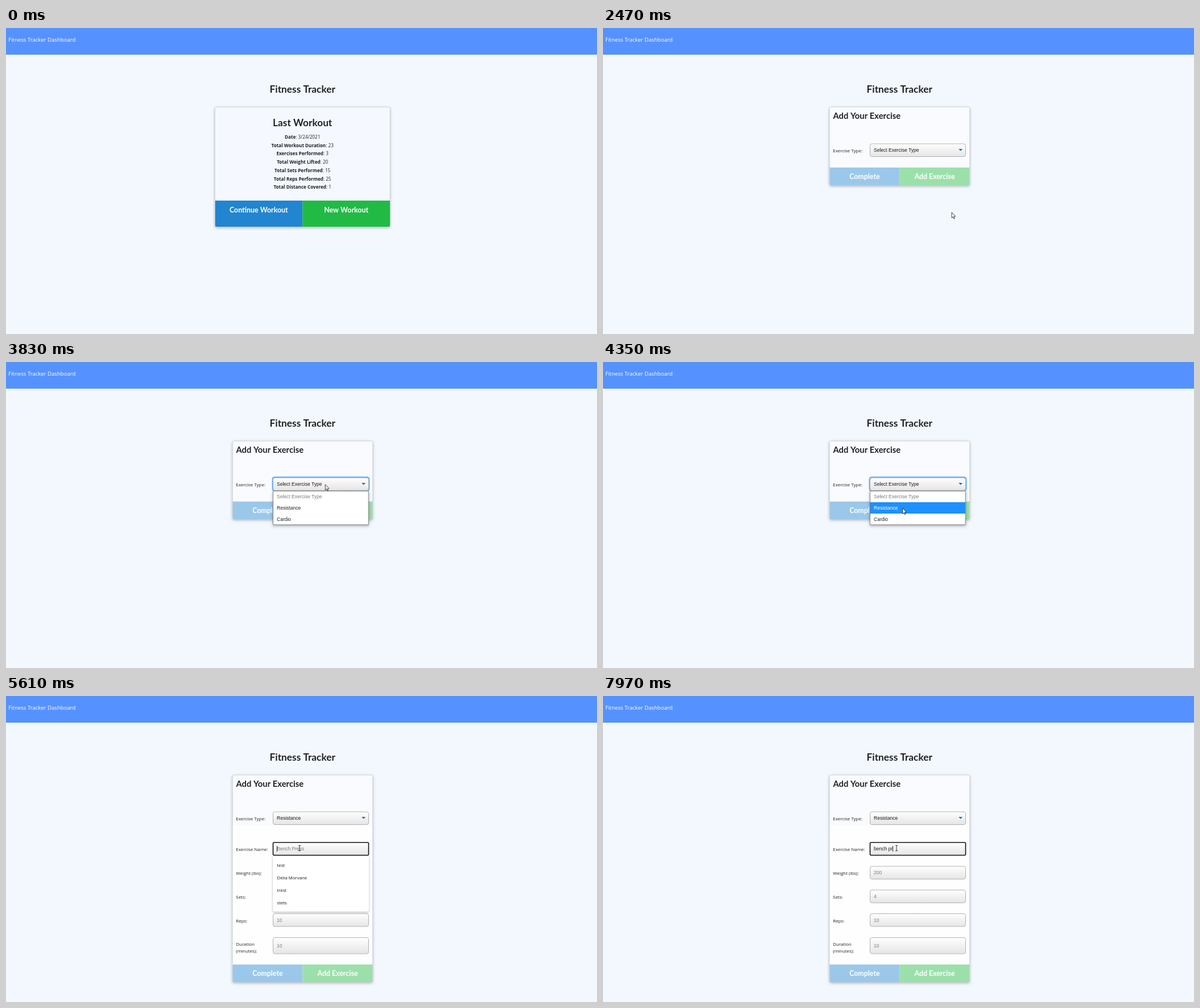
Animation of 1039x539 px, one loop 8000 ms. Source, as an HTML page with a canvas:

```html
<!DOCTYPE html>
<html lang="en">
<head>
<meta charset="utf-8">
<title>Fitness Tracker</title>
<style>
html, body { margin: 0; width: 100%; height: 100%; overflow: hidden; background: #f3f8ff; }
canvas { display: block; }
</style>
</head>
<body>
<canvas id="stage" width="1039" height="539"></canvas>
<script>
const ctx = document.getElementById('stage').getContext('2d');
const LOOP = 8000;
const MID = 521.2;
const UI = '"Open Sans", "Noto Sans", sans-serif';
const HEAD = 'Lato, sans-serif';
const FIELD = '"Liberation Sans", Arial, sans-serif';
const INK = '#1f2124';
const GREY = '#7b7b7b';

// Pointer stops: time, x, y, shape
const POINTER = [
  [0, 0, 0, ''],
  [880, 723, 453, 'arrow'], [1010, 688, 416, 'arrow'], [1140, 648.5, 372.5, 'arrow'],
  [1280, 619, 344, 'hand'], [1400, 579, 319, 'hand'], [1520, 592, 320, 'hand'], [1640, 613, 324.5, 'hand'],
  [2470, 612.8, 324.5, 'arrow'], [2750, 617, 366, 'arrow'], [2870, 621.5, 392, 'arrow'],
  [3140, 614.5, 359.5, 'arrow'], [3290, 564.5, 256.5, 'arrow'],
  [3440, 562, 228, 'arrow'], [3560, 561, 219, 'arrow'], [3680, 561, 215.5, 'arrow'],
  [4080, 546.5, 228, 'arrow'], [4230, 535, 246, 'arrow'], [4350, 526.3, 257.3, 'arrow'],
  [5190, 516, 267.5, 'beam'], [5460, 516, 268, 'beam']
];
const TYPED = [[0, ''], [6760, 'b'], [6880, 'be'], [7000, 'ben'], [7250, 'bench'], [7820, 'bench '], [7970, 'bench pr']];
const STATS = [
  ['Date', '3/24/2021'], ['Total Workout Duration', '23'], ['Exercises Performed', '3'],
  ['Total Weight Lifted', '20'], ['Total Sets Performed', '15'],
  ['Total Reps Performed', '25'], ['Total Distance Covered', '1']
];
// Label, placeholder, top, height
const FIELDS = [
  ['Exercise Name:', 'Bench Press', 257.5, 23], ['Weight (lbs):', '200', 299.5, 23],
  ['Sets:', '4', 341.3, 23], ['Reps:', '10', 383, 23], ['Duration', '10', 425, 29]
];
const HINTS = ['test', 'Delia Morvane', 'trest', 'stets'];

const at = (keys, t) => keys.reduce((found, k) => (k[0] <= t ? k : found));

function text(str, x, y, font, color = INK, align = 'left') {
  ctx.font = font;
  ctx.fillStyle = color;
  ctx.textAlign = align;
  ctx.fillText(str, x, y);
}

function rect(x, y, w, h, color) {
  ctx.fillStyle = color;
  ctx.fillRect(x, y, w, h);
}

function round(x, y, w, h, r) {
  ctx.beginPath();
  ctx.roundRect(x, y, w, h, r);
}

function shadow(alpha, blur, dy) {
  ctx.shadowColor = `rgba(0,0,0,${alpha})`;
  ctx.shadowBlur = blur;
  ctx.shadowOffsetY = dy;
}

function stroke(color, width) {
  ctx.strokeStyle = color;
  ctx.lineWidth = width;
  ctx.stroke();
}

function card(x, w, bottom, fill) {
  ctx.save();
  shadow(0.32, 5, 1.5);
  round(x, 139.3, w, bottom - 139.3, 2.5);
  ctx.fillStyle = fill;
  ctx.fill();
  ctx.restore();
  stroke('#d2d5da', 0.8);
}

function buttons(x, w, top, bottom, left, right, baseline) {
  ctx.save();
  round(x, top, w, bottom - top, [0, 0, 2.5, 2.5]);
  ctx.clip();
  rect(x, top, w / 2, bottom - top, left[1]);
  rect(x + w / 2, top, w / 2, bottom - top, right[1]);
  ctx.restore();
  text(left[0], x + w / 4, baseline, `bold 12.4px ${HEAD}`, '#fff', 'center');
  text(right[0], x + w * 0.75, baseline, `bold 12.4px ${HEAD}`, '#fff', 'center');
}

function box(y, h, state) {
  if (state === 'ring') {
    round(467.5, y - 1.8, 172, h + 3.6, 5);
    ctx.fillStyle = 'rgba(59,153,252,.75)';
    ctx.fill();
  }
  const fill = ctx.createLinearGradient(0, y, 0, y + h);
  fill.addColorStop(0, '#fff');
  fill.addColorStop(1, '#e5e5e5');
  round(469.5, y + 0.5, 168, h - 0.5, state === 'focus' ? 2 : 3.5);
  ctx.fillStyle = fill;
  ctx.fill();
  if (state === 'focus') stroke('#101010', 1.6);
  else stroke(state === 'hover' ? '#888' : '#aaa', 0.9);
}

function summary(hover) {
  card(367.5, 307.5, 350, '#f5f9ff');
  text('Last Workout', MID, 172.6, `bold 17.25px ${HEAD}`, INK, 'center');
  const bold = `bold 8.15px ${UI}`, plain = `8.2px ${UI}`;
  STATS.forEach(([name, value], i) => {
    const y = 194.8 + i * 14.77;
    const rest = ': ' + value;
    ctx.font = bold;
    const a = ctx.measureText(name).width;
    ctx.font = plain;
    const x = MID - (a + ctx.measureText(rest).width) / 2;
    text(name, x, y, bold);
    text(rest, x + a, y, plain);
  });
  buttons(367.5, 307.5, 304, 350, ['Continue Workout', '#2185d0'],
    ['New Workout', hover ? '#16ab39' : '#21ba45'], 325);
}

function typeSelect(t) {
  const chosen = t >= 4880;
  const state = t >= 3830 && t < 5610 ? 'ring' : t >= 3440 && t < 3830 ? 'hover' : '';
  text('Exercise Type:', 404.3, 219, `7.95px ${UI}`);
  box(203.5, 23, state);
  text(chosen ? 'Resistance' : 'Select Exercise Type', 476, 218.2, `8.52px ${FIELD}`, '#1c1c1c');
  ctx.beginPath();
  ctx.moveTo(625.3, 213);
  ctx.lineTo(632, 213);
  ctx.lineTo(628.65, 216.6);
  ctx.fillStyle = '#0070b0';
  ctx.fill();
}

function options(t) {
  const active = t >= 4230;
  ctx.save();
  shadow(0.3, 5, 2);
  rect(469, 227, 168.5, 60, '#fff');
  ctx.restore();
  if (active) rect(469.5, 247, 167.5, 20, '#1e90ff');
  ctx.beginPath();
  ctx.rect(469.5, 227.3, 167.7, 59.4);
  stroke('#777', 0.9);
  const font = `8.52px ${FIELD}`;
  text('Select Exercise Type', 476, 240.4, font, GREY);
  text('Resistance', 476, 260.1, font, active ? '#fff' : INK);
  text('Cardio', 476, 279.8, font);
}

function hints() {
  ctx.save();
  shadow(0.35, 3, 1);
  round(469, 282, 169, 98, [0, 0, 2, 2]);
  ctx.fillStyle = '#fff';
  ctx.fill();
  ctx.restore();
  HINTS.forEach((h, i) => text(h, 476.5, 300.8 + i * 22.1, `500 7.8px ${UI}`, '#151515'));
}

function fields(t) {
  const focused = t >= 5610;
  const typed = at(TYPED, t)[1];
  const font = `8.52px ${FIELD}`;
  FIELDS.forEach(([label, sample, y, h], i) => {
    const first = i === 0;
    const base = y + h / 2 + 3.2;
    text(label, 404.3, i === 4 ? 440 : base + 0.9, `7.95px ${UI}`);
    box(y, h, first && focused ? 'focus' : '');
    if (first && typed) text(typed, 476, base, font, '#1c1c1c');
    else text(sample, 476, base, font, GREY);
  });
  text('(minutes):', 404.3, 451.6, `7.95px ${UI}`);
  if (focused && (t < 6140 || t >= 6640)) {
    ctx.font = font;
    rect(476 + ctx.measureText(typed).width, 264, 0.9, 10, '#111');
  }
  if (focused && !typed) hints();
}

function form(t) {
  const open = t >= 4880;
  const bottom = open ? 504 : 277;
  card(398.3, 246.2, bottom, '#f9fbff');
  if (open) rect(398.8, 228, 245.2, 246, '#fefeff');
  text('Add Your Exercise', 404.4, 160.3, `bold 14.8px ${HEAD}`);
  buttons(398.3, 246.2, open ? 473 : 245.5, bottom, ['Complete', '#9bc8ea'],
    ['Add Exercise', '#9be0ab'], open ? 493.3 : 266);
  typeSelect(t);
  if (open) fields(t);
  else if (t >= 3830) options(t);
}

function outline(points) {
  ctx.beginPath();
  points.forEach(([x, y]) => ctx.lineTo(x, y));
  ctx.closePath();
  ctx.fillStyle = '#fff';
  ctx.fill();
  ctx.lineJoin = 'round';
  stroke('#111', 0.8);
}

const SHAPES = {
  arrow() {
    outline([[0.3, 0.3], [0.3, 10], [2.5, 8], [4, 11.6], [5.5, 11], [4, 7.5], [7, 7.3]]);
  },
  hand() {
    outline([[-1, 0.7], [0, 0], [1, 0.7], [1.1, 4.2], [2.5, 4.4], [3.9, 5], [5.1, 6],
      [5.1, 9], [3.9, 11.4], [3.7, 13.2], [-1.7, 13.2], [-2, 11.6], [-4.5, 8.2],
      [-4.2, 7.2], [-3.2, 7.1], [-1, 8.8]]);
  },
  beam() {
    ctx.beginPath();
    for (const y of [-4.6, 4.6]) {
      ctx.moveTo(-2, y);
      ctx.lineTo(2, y);
    }
    ctx.moveTo(0, -4.6);
    ctx.lineTo(0, 4.6);
    stroke('#222', 0.9);
  }
};

function pointer(t) {
  const [, x, y, shape] = at(POINTER, t);
  if (!shape) return;
  ctx.save();
  ctx.translate(x, y);
  SHAPES[shape]();
  ctx.restore();
}

function draw(t) {
  rect(0, 0, 1039, 539, '#f3f8ff');
  rect(0, 0, 1039, 47, '#5692ff');
  text('Fitness Tracker Dashboard', 4.2, 23.8, `9.6px ${UI}`, '#fff');
  text('Fitness Tracker', MID, 114, `bold 17.25px ${HEAD}`, INK, 'center');
  if (t < 2470) summary(t >= 1280);
  else form(t);
  pointer(t);
}

const start = performance.now();
function tick() {
  draw((performance.now() - start) % LOOP);
  requestAnimationFrame(tick);
}
tick();
</script>
</body>
</html>
```
